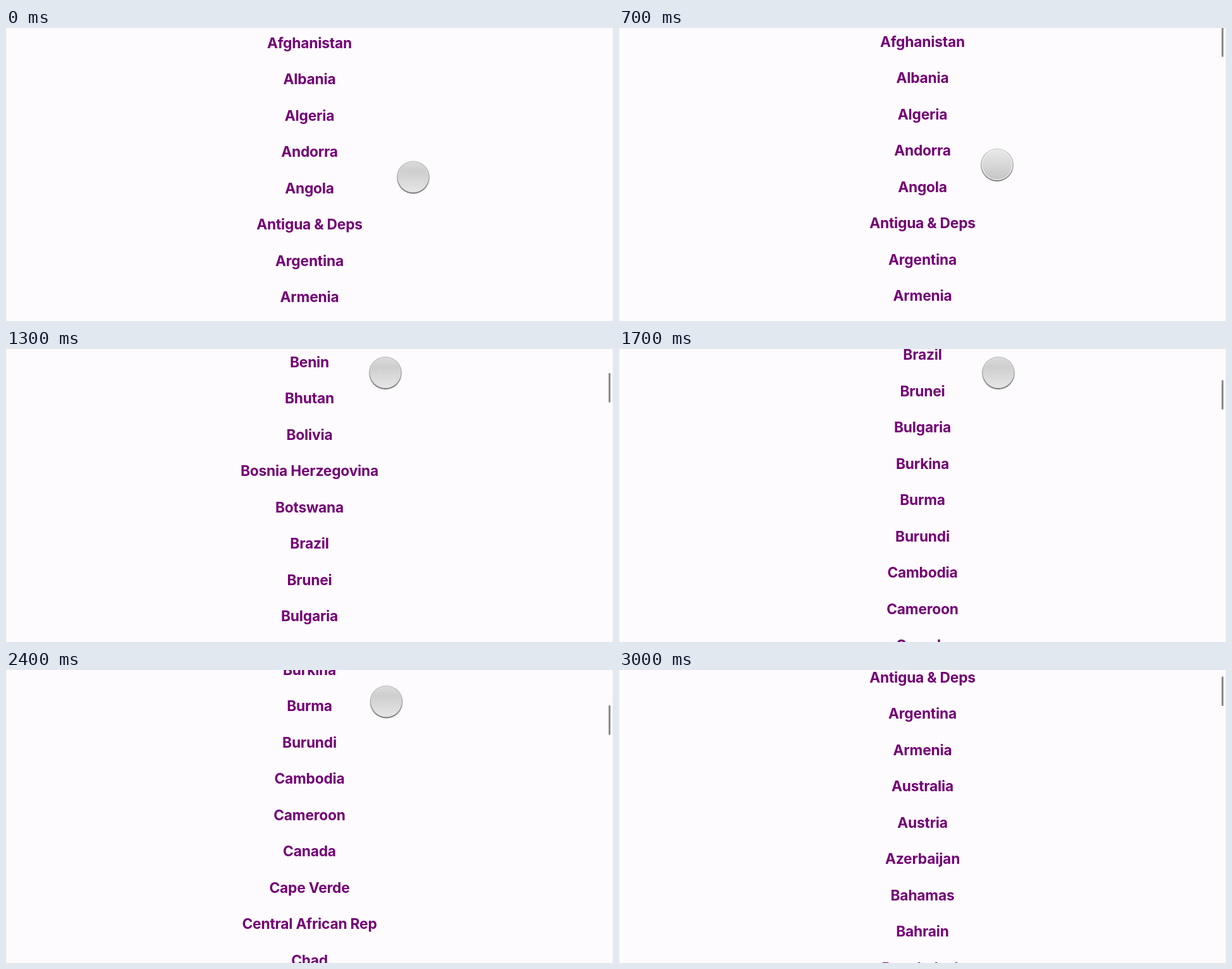
An HTML page for the animation above (3100 ms loop, 960x464 px).

```html
<!DOCTYPE html>
<html lang="en">
<head>
<meta charset="utf-8">
<title>Country list</title>
<style>
  html, body { margin: 0; width: 100%; height: 100%; overflow: hidden; background: #fdfbfe; }
  svg { display: block; width: 960px; height: 464px; }
  text {
    font: 700 22.75px Inter, "Open Sans", sans-serif;
    letter-spacing: -0.2px;
    text-anchor: middle;
    fill: #730075;
  }
</style>
</head>
<body>
<svg viewBox="0 0 960 464">
  <defs>
    <linearGradient id="rim" x2="0" y2="1">
      <stop offset="0" stop-color="#c6c6c6"/>
      <stop offset=".6" stop-color="#a6a6a6"/>
      <stop offset="1" stop-color="#757575"/>
    </linearGradient>
    <linearGradient id="up" x2="0" y2="1">
      <stop offset="0" stop-color="#dadada"/>
      <stop offset=".3" stop-color="#cecece"/>
      <stop offset="1" stop-color="#e6e6e6"/>
    </linearGradient>
    <linearGradient id="down" x2="0" y2="1">
      <stop offset="0" stop-color="#e8e8e8"/>
      <stop offset="1" stop-color="#c6c6c6"/>
    </linearGradient>
  </defs>
  <rect width="960" height="464" fill="#fdfbfe"/>
  <path d="M.5 0V464M959.5 0V464" stroke="#f3f1f4"/>
  <g id="list"></g>
  <rect id="bar" x="953" width="3" height="47" rx="1.5" fill="#8b8a8c"/>
  <g id="knob">
    <circle r="26" fill="url(#rim)"/>
    <circle id="ring" r="24.4" cy="-.3"/>
    <circle id="face" r="23.4" cy="-.3"/>
  </g>
</svg>
<script>
const LOOP = 3100, STEP = 100, PITCH = 57.5;
const names = `Afghanistan,Albania,Algeria,Andorra,Angola,Antigua & Deps,Argentina,Armenia,
Australia,Austria,Azerbaijan,Bahamas,Bahrain,Bangladesh,Barbados,Belarus,Belgium,Belize,
Benin,Bhutan,Bolivia,Bosnia Herzegovina,Botswana,Brazil,Brunei,Bulgaria,Burkina,Burma,
Burundi,Cambodia,Cameroon,Canada,Cape Verde,Central African Rep,Chad,Chile`.split(",");

const [list, bar, knob, ring, face] =
  ["list", "bar", "knob", "ring", "face"].map(id => document.getElementById(id));

names.forEach((name, i) => {
  const row = document.createElementNS("http://www.w3.org/2000/svg", "text");
  row.setAttribute("x", 480);
  row.setAttribute("y", 31.9 + i * PITCH);
  row.textContent = name.trim();
  list.append(row);
});

const progress = (t, from, to) => Math.min(1, Math.max(0, (t - from) / (to - from)));
const smooth = p => p * p * (3 - 2 * p);
const decay = ms => Math.exp(-ms / 500);

// Finger travel of the upward and the downward swipe
const swipeUp = t => 181 * progress(t, 670, 828) ** 2.7;
const swipeDown = t => 440 * progress(t, 2400, 2600) ** 1.3;

function scrollAt(t) {
  if (t < 828) return swipeUp(t);
  if (t < 2390) return 1581 - 989 * decay(t - 1000);
  if (t < 2600) return 1519 - swipeDown(t);
  return 1079 - 1415 * (1 - decay(t - 2600));
}

function knobAt(t) {
  const move = smooth(progress(t, 50, 660));
  const back = progress(t, 2350, 2400);
  return [
    644 - 46 * move + 2 * progress(t, 700, 828) + 1.5 * back,
    236.5 - 17.5 * move - swipeUp(t) + 12.5 * back + swipeDown(t)
  ];
}

function draw(now) {
  const t = Math.floor(now % LOOP / STEP) * STEP;
  const y = scrollAt(t);
  const pressed = (t > 670 && t < 828) || t > 2400;
  list.setAttribute("transform", `translate(0 ${-y})`);
  bar.setAttribute("y", -1.4 + y * 0.0377);
  bar.style.visibility = t < 700 ? "hidden" : "visible";
  knob.setAttribute("transform", `translate(${knobAt(t)})`);
  ring.setAttribute("fill", pressed ? "#f8f8f8" : "#dcdcdc");
  face.setAttribute("fill", pressed ? "url(#down)" : "url(#up)");
}

const start = performance.now();
function tick() {
  draw(performance.now() - start);
  requestAnimationFrame(tick);
}
tick();
</script>
</body>
</html>
```
